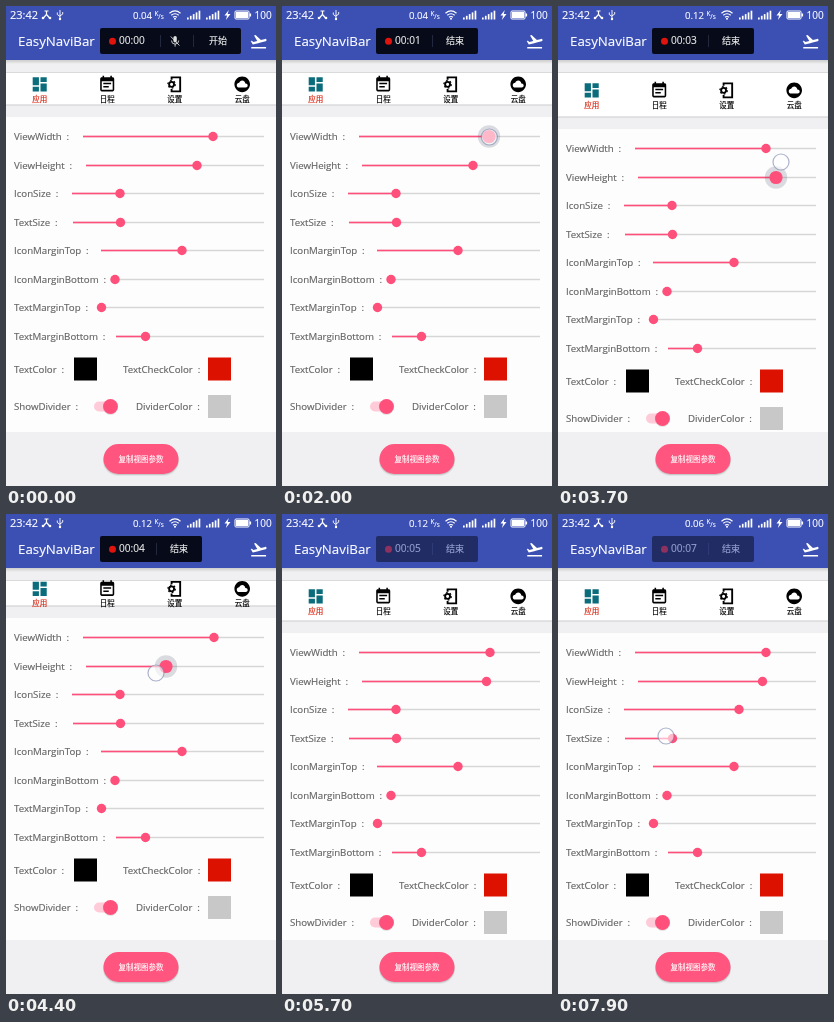
Animation, 270 px wide and 480 px high, one loop 8000 ms. Source, as an HTML page:

```html
<!DOCTYPE html>
<html lang="zh-CN">
<head>
<meta charset="utf-8">
<title>EasyNaviBar</title>
<style>
  html, body { margin: 0; width: 100%; height: 100%; overflow: hidden; background: #f0eff1; }
  svg { display: block; width: 270px; height: 480px; }
  text { font-family: "Open Sans", "Noto Sans", sans-serif; font-weight: 500; stroke-width: .15; }
  .zh { font-family: "Noto Sans CJK SC", "Noto Sans CJK", sans-serif; }
  .mid { text-anchor: middle; }
</style>
</head>
<body>
<svg id="stage" viewBox="0 0 270 480">
  <defs>
    <clipPath id="view"><rect y="54" width="270" height="372"/></clipPath>
    <linearGradient id="drop" x2="0" y2="1">
      <stop stop-color="#000" stop-opacity=".15"/><stop offset="1" stop-color="#000" stop-opacity="0"/>
    </linearGradient>
  </defs>
  <rect width="270" height="480" fill="#f0eff1"/>
</svg>
<script>
const LOOP = 8000, STEP = 100;
const PINK = '#ff4f7b', GREY = '#c8c8c8', INK = '#626262';
const stage = document.getElementById('stage');

function add(parent, tag, attrs, text) {
  const el = document.createElementNS('http://www.w3.org/2000/svg', tag);
  set(el, attrs);
  if (text !== undefined) el.textContent = text;
  parent.appendChild(el);
  return el;
}
function set(el, attrs) {
  for (const k in attrs) el.setAttribute(k, attrs[k]);
}
const rect = (p, x, y, width, height, fill, rx = 0) => add(p, 'rect', { x, y, width, height, fill, rx });
const dot = (p, cx, cy, r, fill) => add(p, 'circle', { cx, cy, r, fill });
const path = (p, d, attrs) => add(p, 'path', { d, ...attrs });
const line = (p, d, stroke, width = 1) => path(p, d, { fill: 'none', stroke, 'stroke-width': width });
const label = (p, x, y, size, fill, str, cls = '') =>
  add(p, 'text', { x, y, 'font-size': size, fill, stroke: fill, class: cls }, str);
const show = (el, on) => el.setAttribute('visibility', on ? 'visible' : 'hidden');

// Linear value from [time, value] pairs.
function at(keys, t) {
  const i = keys.findIndex(k => k[0] > t);
  if (i === 0) return keys[0][1];
  if (i < 0) return keys[keys.length - 1][1];
  const [t0, a] = keys[i - 1], [t1, b] = keys[i];
  return a + (b - a) * (t - t0) / (t1 - t0);
}

// ---- Motion ----
const widthX = [[500, 207], [700, 196], [900, 162], [1100, 128], [1200, 121], [1300, 121],
  [1400, 122], [1600, 168], [1800, 203], [2000, 207], [2300, 208]];
const heightX = [[3400, 191], [3700, 218], [3800, 223], [3900, 224], [4200, 190], [4400, 160],
  [4500, 150], [4600, 148], [4800, 165], [5000, 190], [5200, 204.5]];
const iconX = [[6100, 114], [6400, 140], [6800, 183], [7000, 181]];
const shift = [[3400, 0], [3700, 12], [3900, 14], [4200, 4], [4400, -7], [4600, -9],
  [4800, -3], [5000, 4], [5200, 8]];
const touches = [
  { row: 0, from: 500, to: 3000, y: [[500, 131]] },
  { row: 1, from: 3300, to: 5300, y: [[3400, 159], [3700, 156], [4400, 159]] },
  { row: 2, from: 6000, to: 7200, y: [[6000, 196]] },
  { row: 3, from: 7700, to: LOOP, y: [[7700, 222]], x: 108 }
];

// ---- Bottom-tab preview ----
const NAV_TOP = 66, NAV_HEIGHT = 32.5;
const content = add(stage, 'g', { 'clip-path': 'url(#view)' });
const nav = add(content, 'g', {});
const navBack = rect(nav, 0, NAV_TOP, 270, NAV_HEIGHT, '#fff');
const navTop = rect(nav, 0, NAV_TOP, 270, 1, '#dadada');
const navShade = rect(nav, 0, 0, 270, 2, 'url(#drop)');
const gear = '<path d="M8 6V3h11v18H8v-3" fill="none" stroke="#000" stroke-width="2.4"/>' +
  '<circle cx="8" cy="12" r="3.2" fill="none" stroke="#000" stroke-width="2.4"/>' +
  '<circle cx="8" cy="12" r="4.8" fill="none" stroke="#000" stroke-width="1.6" stroke-dasharray="2.2 2.8"/>';
const icons = [
  'M3 13h8V3H3v10zm0 8h8v-6H3v6zm10 0h8V11h-8v10zm0-18v6h8V3h-8z',
  'M19 3h-1V1h-2v2H8V1H6v2H5c-1.1 0-2 .9-2 2v14c0 1.1.9 2 2 2h14c1.1 0 2-.9 2-2V5c0-1.1-.9-2-2-2zm0 16H5V8h14v11zM7 10h10v2H7zm0 4h7v2H7z',
  '',
  'M12 2C6.48 2 2 6.48 2 12s4.48 10 10 10 10-4.48 10-10S17.52 2 12 2zm4.5 14H8c-1.66 0-3-1.34-3-3s1.34-3 3-3l.14.01C8.58 8.28 10.13 7 12 7c2.21 0 4 1.79 4 4h.5c1.38 0 2.5 1.12 2.5 2.5S17.88 16 16.5 16z'
];
const tabs = ['应用', '日程', '设置', '云盘'].map((name, i) => {
  const tab = add(nav, 'g', {});
  const icon = add(tab, 'g', { transform: 'translate(-9.4 69) scale(.78)' });
  if (icons[i]) path(icon, icons[i], { fill: i ? '#000' : '#0b6c7c' });
  else icon.innerHTML = gear;
  label(tab, 0, 95.7, 7.5, i ? '#000' : '#d8200c', name, 'zh mid');
  return tab;
});

// ---- Settings panel ----
const panel = add(content, 'g', {});
rect(panel, 0, 111, 270, 340, '#fdfdfd');
const field = (x, y, name) => label(panel, x, y, 9.7, INK, name + '\u2002:');
const swatch = (x, y, fill) => rect(panel, x, y, 23, 23, fill);

const sliders = [
  ['ViewWidth', 77, 207], ['ViewHeight', 80, 191], ['IconSize', 66, 114], ['TextSize', 67, 114.5],
  ['IconMarginTop', 95, 176], ['IconMarginBottom', 107, 109], ['TextMarginTop', 94, 95.5],
  ['TextMarginBottom', 110, 139.5]
].map(([name, start, x], i) => {
  const y = Math.round(130.3 + i * 28.5) + .5;
  field(8, y + 3.4, name);
  rect(panel, start, y - .75, 258 - start, 1.5, '#d6d6d6');
  const bar = rect(panel, start, y - .8, x - start, 1.6, PINK);
  const halo = dot(panel, x, y, 11.2, 'rgba(80,85,110,.2)');
  const thumb = dot(panel, x, y, 4.7, PINK);
  return { start, x, bar, halo, thumb };
});
field(8, 366.6, 'TextColor');
swatch(68, 351.5, '#000');
field(117, 366.6, 'TextCheckColor');
swatch(202, 351.5, '#dd1100');
field(8, 404.1, 'ShowDivider');
rect(panel, 88, 395.5, 22, 10, '#ffcbd8', 5);
dot(panel, 104.5, 401.3, 7.6, 'rgba(0,0,0,.1)');
dot(panel, 104.5, 400.5, 7.4, PINK);
field(130, 404.1, 'DividerColor');
swatch(202, 389, GREY);

// ---- Button ----
rect(stage, 97, 440, 76, 30, 'rgba(0,0,0,.06)', 15);
rect(stage, 97.3, 439, 75.4, 30, 'rgba(0,0,0,.12)', 15);
rect(stage, 97.5, 438, 75, 30, '#ff557f', 15);
label(stage, 135, 455.8, 7.5, '#fff', '复制视图参数', 'zh mid');

// ---- Header ----
rect(stage, 0, 54, 270, 4, 'url(#drop)');
rect(stage, 0, 0, 270, 54, '#3c50b4');
label(stage, 4, 13, 11, '#fff', '23:42');
line(stage, 'M40.5 4.5v4l-3.6 4M40.5 8.5l3.6 4M38.5 5h4', '#fff', 1.2);
dot(stage, 37, 12, 1.3, '#fff');
dot(stage, 44, 12, 1.3, '#fff');
line(stage, 'M54 4v9M51.3 6.5v2l2.7 2M56.7 6v2.2l-2.7 1.6', '#fff', .9);
dot(stage, 54, 13, 1.2, '#fff');
const speed = label(stage, 127, 12.8, 9.6, '#fff', '0.04');
label(stage, 148.5, 10, 6.4, '#fff', 'K');
label(stage, 152.3, 12.6, 6.4, '#fff', '/s');
line(stage, 'M163.5 7.2q5.5-4.6 11 0M165.3 9.3q3.7-3.1 7.4 0M167 11.3q2-1.6 4 0', '#fff', 1.2);
dot(stage, 169, 12.8, 1, '#fff');
for (const x of [181, 200])
  for (let i = 0; i < 5; i++) rect(stage, x + i * 2.9, 11.5 - i * 1.7, 1.7, 2 + i * 1.7, '#fff');
path(stage, 'M222.8 4l-4.3 5.6h2.6l-1.2 4.4 4.6-6h-2.8z', { fill: '#fff' });
add(stage, 'rect', { x: 229, y: 5, width: 14, height: 8, rx: 1, fill: 'none', stroke: '#fff' });
rect(stage, 230, 6, 12, 6, '#fff');
rect(stage, 243.5, 7.5, 1.6, 3, '#fff');
label(stage, 248.5, 12.8, 10, '#fff', '100');
label(stage, 12, 39.8, 13.3, '#fff', 'EasyNaviBar');
path(stage, 'M2.5 19h19v2h-19zm19.57-9.36c-.21-.8-1.04-1.28-1.84-1.06L14.92 10l-6.9-6.43-1.93.51 4.14 7.17-4.97 1.33-1.97-1.54-1.45.39 1.82 3.16.77 1.33 1.6-.43 5.31-1.42 4.35-1.16L21 11.49c.81-.23 1.28-1.05 1.07-1.85z',
  { fill: '#fff', transform: 'translate(243.3 26.2) scale(.78)' });

// ---- Recorder ----
const rec = add(stage, 'g', {});
const recBack = rect(rec, 94, 22, 141, 26, '#070a18', 2);
dot(rec, 106.5, 35.3, 3.5, '#e0140c');
const clock = label(rec, 113, 38.4, 10.1, '#eee', '00:00');
const idle = add(rec, 'g', {});
line(idle, 'M154.5 29v12M187.5 29v12', '#23283c');
rect(idle, 167.4, 30, 3.4, 6.4, '#ddd', 1.7);
line(idle, 'M165.5 34.5q0 3.6 3.6 3.6t3.6-3.6M169.1 38v2.6M164.8 30.5l8.6 9', '#ddd', .9);
label(idle, 203, 38.2, 9, '#eee', '开始', 'zh');
const busy = add(rec, 'g', {});
line(busy, 'M150.5 29v12', '#23283c');
label(busy, 164, 38.2, 9, '#eee', '结束', 'zh');

// ---- Finger ----
const finger = add(stage, 'circle', { r: 8, fill: 'rgba(255,255,255,.6)', stroke: 'rgba(105,118,160,.55)', 'stroke-width': 1.2 });

function draw(t) {
  const dy = at(shift, t);
  const xs = [widthX, heightX, iconX];
  const posOf = (row, time) => xs[row] ? at(xs[row], time) : sliders[row].x;
  const touch = touches.find(k => t >= k.from && t < k.to);

  sliders.forEach((s, i) => {
    const x = posOf(i, t), held = !!touch && touch.row === i && i < 3;
    set(s.bar, { width: x - s.start });
    set(s.thumb, { cx: x, r: held ? 6.6 : 4.7 });
    set(s.halo, { cx: x });
    show(s.halo, held);
  });

  const w = Math.min(270, 98 + (posOf(0, t) - 121) * 2), left = 135 - w / 2;
  for (const el of [navBack, navTop, navShade]) set(el, { x: left, width: w });
  set(navBack, { height: NAV_HEIGHT + dy });
  set(navShade, { y: NAV_TOP + NAV_HEIGHT + dy });
  tabs.forEach((tab, i) => set(tab, { transform: `translate(${left + w * (i + .5) / 4} ${dy / 2})` }));
  set(panel, { transform: `translate(0 ${dy})` });

  show(finger, !!touch);
  if (touch) set(finger, { cx: touch.x || posOf(touch.row, t + 100), cy: at(touch.y, t) });

  const on = t >= 200;
  show(idle, !on);
  show(busy, on);
  set(recBack, { width: on ? 102 : 141 });
  set(rec, { opacity: at([[5000, 1], [5300, .5]], t) });
  clock.textContent = '00:0' + Math.max(0, Math.floor((t - 200) / 1000));
  speed.textContent = t < 2800 ? '0.04' : t < 6000 ? '0.12' : '0.06';
}

const begin = performance.now();
function tick() {
  const t = (performance.now() - begin) % LOOP;
  draw(Math.floor(t / STEP) * STEP);
  requestAnimationFrame(tick);
}
tick();
</script>
</body>
</html>
```
